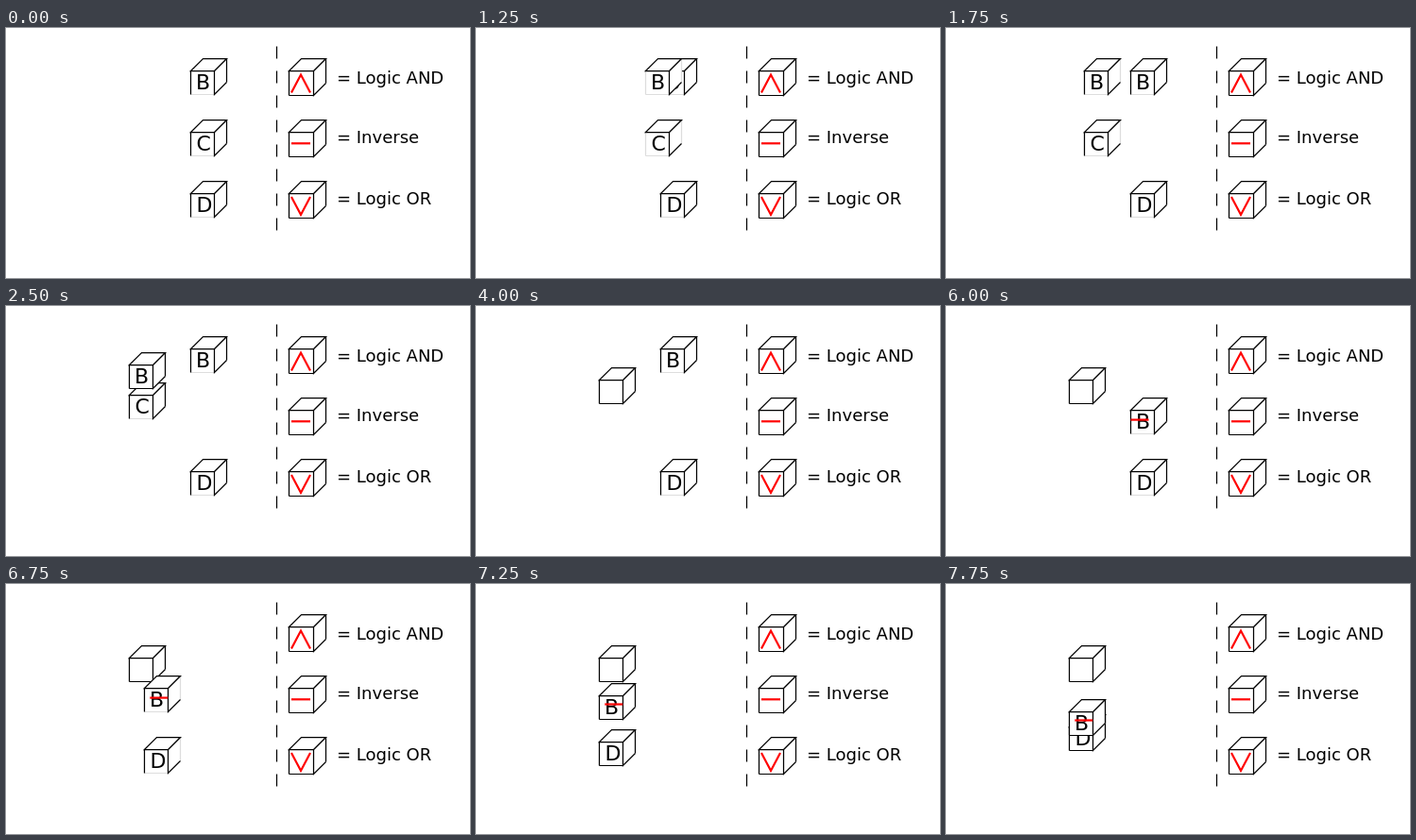
Animation, 491 px wide and 265 px high, one loop 8000 ms. Source, as an HTML page with a canvas:

```html
<!DOCTYPE html>
<html lang="en">
<head>
<meta charset="utf-8">
<title>Logic cubes</title>
<style>
  html, body { margin: 0; width: 100%; height: 100%; overflow: hidden; background: #fff; }
  canvas { display: block; }
</style>
</head>
<body>
<canvas id="stage" width="491" height="265"></canvas>
<script>
const ctx = document.getElementById('stage').getContext('2d');
const LOOP = 8000, STEP = 250;
const FAINT = '#ddd', BLACK = '#000', RED = '#f00';
const HOME = 195, DOCK = 130;
const TOP = 32, MIDDLE = 97, BOTTOM = 162;

function path(points, color, width = 1.25, close = false) {
  ctx.beginPath();
  points.forEach(([x, y]) => ctx.lineTo(x, y));
  if (close) ctx.closePath();
  ctx.strokeStyle = color;
  ctx.lineWidth = width;
  ctx.stroke();
}

function text(str, x, y, size) {
  ctx.font = `${size}px "DejaVu Sans", sans-serif`;
  ctx.fillStyle = BLACK;
  ctx.fillText(str, x, y);
}

// x, y is the upper left corner of the cube's bounding box.
function cube(x, y, { size = 25, left = BLACK, right = BLACK, bottom = BLACK } = {}) {
  const l = x + 0.5, t = y + 13.5, r = l + size, b = t + size, d = 13;
  ctx.beginPath();
  [[l, t], [l + d, t - d], [r + d, t - d], [r + d, b - d], [r, b], [l, b]]
    .forEach(([px, py]) => ctx.lineTo(px, py));
  ctx.fillStyle = '#fff';
  ctx.fill();
  path([[l, b], [r, b]], bottom, 1);
  path([[l, t], [l, b]], left);
  path([[r + d, t - d], [r + d, b - d]], right);
  path([[l, t], [l + d, t - d], [r + d, t - d], [r, t]], BLACK, 1.25, true);
  path([[r, t], [r, b], [r + d, b - d]], BLACK);
}

function letterCube(letter, x, y, bottom = FAINT) {
  cube(x, y, {
    left: x === 179 ? FAINT : BLACK,
    right: x === 179 || x === 146 ? FAINT : BLACK,
    bottom
  });
  text(letter, x + (letter === 'B' ? 6 : 6.5), y + 33, 22);
}

const bar = (x, y, length = 20) => path([[x, y], [x + length, y]], RED, 2.2);
const wedge = (x, base, tip) => path([[x, base], [x + 10, tip], [x + 20, base]], RED, 2.2);

function legend() {
  for (let y = 19.5; y < 210; y += 26) path([[286.5, y], [286.5, y + 13]], BLACK);
  for (const y of [TOP, MIDDLE, BOTTOM]) cube(299, y, { size: 26 });
  wedge(302, 68.5, 49.5);
  bar(302, 122.3);
  wedge(302, 179, 198);
  text('= Logic AND', 350, 59, 18);
  text('= Inverse', 350, 122, 18);
  text('= Logic OR', 350, 187, 18);
}

// Counts the quarter-second jumps made since start, from 0 to 4.
const jumps = (t, start) => Math.max(0, Math.min(4, Math.floor((t - start) / STEP) + 1));
const slide = (from, to, n) => Math.round(from + (to - from) * n / 4);

// Two cubes travel left together, then close in on each other.
function pair(t, start, upperY, lower, lowerY, meetY) {
  const across = jumps(t, start), closing = jumps(t, start + 1000);
  const x = slide(HOME, DOCK, across);
  const y = slide(upperY, meetY, closing);
  letterCube(lower, x, slide(lowerY, meetY, closing),
    closing && lower === 'D' ? BLACK : FAINT);
  letterCube('B', x, y, closing ? BLACK : FAINT);
  return [x, y];
}

function draw(t) {
  ctx.fillStyle = '#fff';
  ctx.fillRect(0, 0, 491, 265);
  legend();

  if (t >= 3000) {
    cube(DOCK, 65);
    if (t < 4000) wedge(DOCK + 3.2, 101.5, 82.5);
  }

  if (t < 6000) {
    const drop = jumps(t, 5250);
    letterCube('B', HOME, slide(TOP, MIDDLE, drop), drop ? BLACK : FAINT);
    letterCube('D', HOME, BOTTOM);
    if (t < 3000) {
      if (t < 1250) letterCube('C', HOME, MIDDLE);
      else pair(t, 1250, TOP, 'C', MIDDLE, 65);
    }
  } else {
    const [x, y] = pair(t, 6250, MIDDLE, 'D', BOTTOM, 130);
    bar(x + (t < 6250 ? 0.5 : 6.3), y + (t < 7250 ? 23.6 : 22.5), 19);
  }
}

function frame() {
  draw(performance.now() % LOOP);
  requestAnimationFrame(frame);
}
frame();
</script>
</body>
</html>
```
